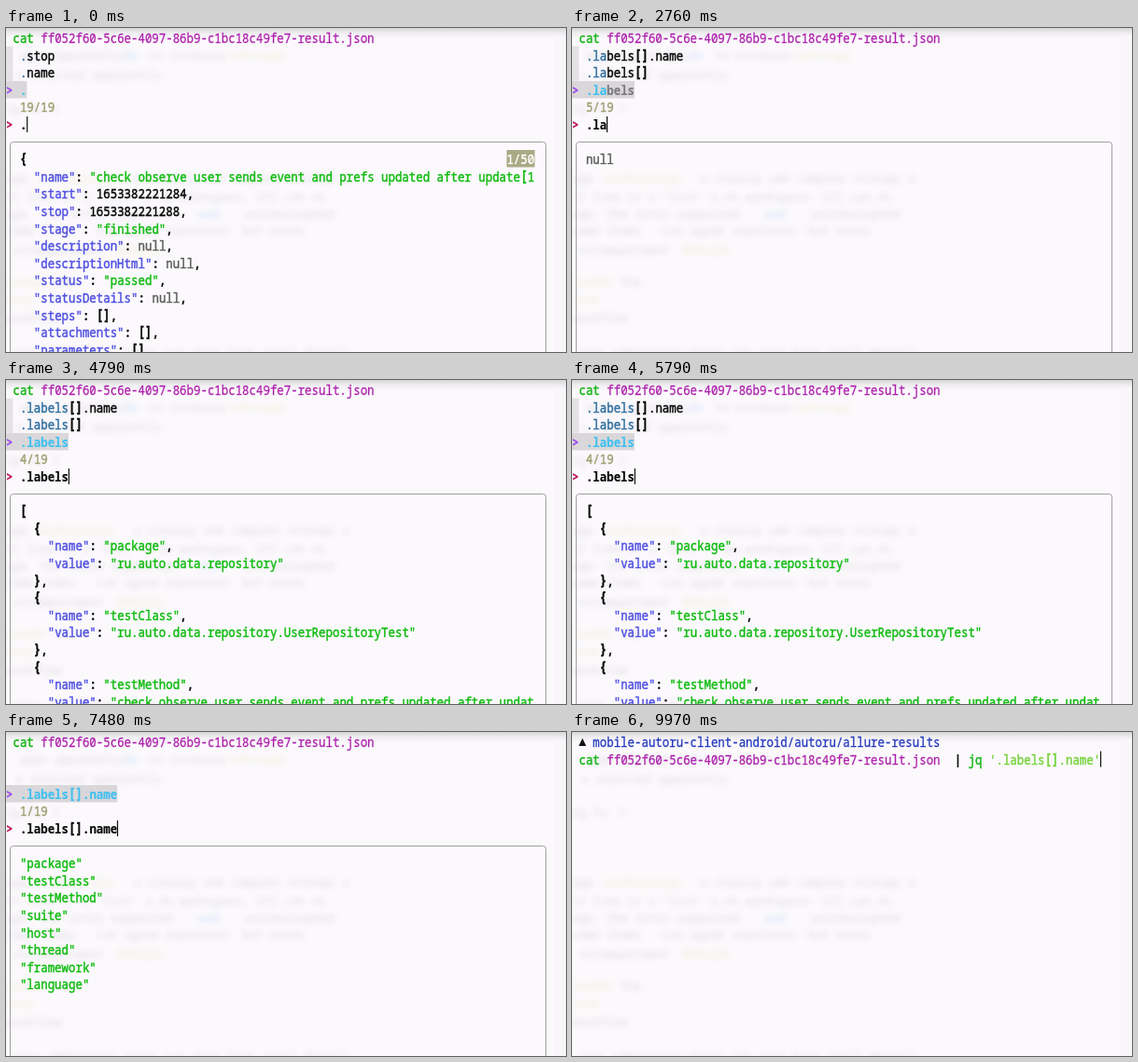
Recreate the animation shown at these times as an HTML page. Size 600x348 px, loop 10000 ms.

```html
<!DOCTYPE html>
<html lang="en">
<head>
<meta charset="utf-8">
<title>Interactive jq</title>
<style>
html, body { margin: 0; width: 100%; height: 100%; overflow: hidden; background: #fbf9fc; }
svg { display: block; width: 600px; height: 348px; }
text { font: 400 12.417px "Noto Sans Mono", "DejaVu Sans Mono", monospace; white-space: pre; font-variant-ligatures: none; }
#screen text { fill: currentColor; stroke: currentColor; stroke-width: .42px; }
#screen .file, #screen .path { stroke-width: .25px; }
#screen .b { font-weight: 700; stroke-width: .12px; }
#screen .tall { font-weight: 700; stroke-width: .3px; }
.cmd { color: #16b516; }
.file { color: #ad1fad; }
.black { color: #080808; }
.hit { color: #2f6f9f; }
.selHit { color: #3fc0f0; }
.sel { color: #7d7b7e; }
.ptr { color: #9a45ee; }
.prompt { color: #bb0d55; }
.count { color: #a0a074; }
.key { color: #5050e2; }
.str { color: #10bb10; }
.nul { color: #5c5c5c; }
.path { color: #2338bd; }
.arg { color: #75d33b; }
.badge { color: #fff; }
</style>
</head>
<body>
<svg viewBox="0 0 600 348">
  <defs>
    <linearGradient id="shade" x1="0" y1="0" x2="0" y2="1">
      <stop offset="0" stop-color="#d7d5d8"/>
      <stop offset=".45" stop-color="#efedf0"/>
      <stop offset="1" stop-color="#fbf9fc"/>
    </linearGradient>
    <filter id="soft" x="-5%" y="-5%" width="110%" height="110%"><feGaussianBlur stdDeviation="3.4"/></filter>
  </defs>
  <rect width="600" height="348" fill="#fbf9fc"/>
  <rect width="600" height="12" fill="url(#shade)"/>
  <rect x="587" y="8" width="13" height="340" fill="#f9f6fa"/>
  <g id="blur" filter="url(#soft)" opacity=".24"></g>
  <g id="screen"></g>
</svg>
<script>
const CW = 7.45, RH = 18.6, LOOP = 10000;
const $ = id => document.getElementById(id);
const esc = s => s.replace(/&/g, '&amp;').replace(/</g, '&lt;');

// the terminal face is narrow and tall, its brackets taller still
function put(row, col, s, cls) {
  const y = (15.9 + row * RH).toFixed(2);
  return s.split(/([[\]{}]+)/).map((part, i) => {
    const x = (col * CW).toFixed(2), tall = i % 2;
    col += part.length;
    return part && `<text class="${cls}${tall ? ' tall' : ''}" transform="translate(${x} ${y}) scale(1 ${tall ? 1.35 : 1.2})">${esc(part)}</text>`;
  }).join('');
}

// runs alternate text and class
function runs(row, col, ...parts) {
  let out = '';
  for (let i = 0; i < parts.length; i += 2) {
    if (parts[i]) out += put(row, col, parts[i], parts[i + 1]);
    col += parts[i].length;
  }
  return out;
}

const box = (x, y, w, h, fill) => `<rect x="${x}" y="${y}" width="${w}" height="${h}" fill="${fill}"/>`;
const caret = (row, col) => box((col * CW - .3).toFixed(1), (row * RH + 2).toFixed(1), 1.2, 17, '#111');

function json(lines) {
  const token = /("[^"]*"?)(?=:)|("[^"]*"?)|(null)|(\d+)|([^\s"\w]+)/g;
  const names = ['key', 'str', 'nul', 'black', 'black b'];
  return lines.map((line, i) => [...line.matchAll(token)].map(m =>
    put(7 + i, 2 + m.index, m[0], names[m.slice(1).findIndex(Boolean)])).join('')).join('');
}

const test = 'check observe user sends event and prefs updated after updat';
const result = ['{', `  "name": "${test}e[1`, ...[
  '"start": 1653382221284', '"stop": 1653382221288', '"stage": "finished"',
  '"description": null', '"descriptionHtml": null', '"status": "passed"',
  '"statusDetails": null', '"steps": []', '"attachments": []', '"parameters": []'
].map(s => `  ${s},`)];

const label = (name, value) => ['  {', `    "name": "${name}",`, `    "value": "${value}`, '  },'];
const labels = ['[',
  ...label('package', 'ru.auto.data.repository"'),
  ...label('testClass', 'ru.auto.data.repository.UserRepositoryTest"'),
  ...label('testMethod', test).slice(0, 3)];

const names = 'package testClass testMethod suite host thread framework language'
  .split(' ').map(s => `"${s}"`);

const command = row => runs(row, 1, 'cat', 'cmd', ' ', '',
  'ff052f60-5c6e-4097-86b9-c1bc18c49fe7-result.json', 'file');

function finder(query, count, items, preview, badge) {
  const n = query.length;
  const [chosen, ...rest] = items;
  let out = command(0);
  rest.forEach((item, i) => {
    const row = 2 - i;
    out += box(0, (row * RH + 1).toFixed(1), CW, RH, '#e4e2e5')
      + runs(row, 2, item.slice(0, n), 'hit', item.slice(n), 'black');
  });
  out += box(0, 57, ((2 + chosen.length) * CW).toFixed(1), 18.5, '#d9d7d9')
    + runs(3, 0, '>', 'ptr b', ' ', '', chosen.slice(0, n), 'selHit b', chosen.slice(n), 'sel b')
    + put(4, 2, count + '/19', 'count')
    + runs(5, 0, '>', 'prompt b', ' ', '', query, 'black b')
    + caret(5, 2 + n)
    + '<rect x="4.5" y="122.5" width="574" height="260" rx="3" fill="none" stroke="#a09ea1"/>'
    + json(preview);
  if (badge) out += box(536.5, 131, 30, 18.5, '#a9a986') + put(7, 72, badge, 'badge');
  return out;
}

const prompt = () => '<path d="M7.2 15 L11.2 6.8 L15.2 15Z" fill="#111"/>'
  + put(0, 3, 'mobile-autoru-client-android/autoru/allure-results', 'path')
  + command(1)
  + runs(1, 55, '|', 'black b', ' ', '', 'jq', 'cmd', ' ', '', "'.labels[].name'", 'arg')
  + caret(1, 76);

const found = ['.labels', '.labels[]', '.labels[].name'];
const typed = (q, count) => finder(q, count, found, ['null']);

const scenes = [
  [0, finder('.', 19, ['.', '.name', '.stop'], result, '1/50')],
  [2450, typed('.l', 6)],
  [2600, typed('.la', 5)],
  [3500, typed('.lab', 4)],
  [4500, typed('.labe', 4)],
  [4640, typed('.label', 4)],
  [4780, finder('.labels', 4, found, labels)],
  [6770, finder('.labels[].name', 1, ['.labels[].name'], names)],
  [8800, prompt()]
];

// out-of-focus page behind the terminal: y, x, text, colour
const G = '#77747a', Y = '#b9bd45', B = '#3f8fe8';
$('blur').innerHTML = [
  [34, 15, 'apps apparently', G], [34, 126, 'do', B], [34, 153, 'to increase', G], [34, 240, 'settings', Y],
  [55, 10, 'a selected apparently', G], [91, 0, 'ng fu', G], [91, 50, 'l', G],
  [166, 0, 'age', G], [166, 34, 'instruction', Y], [166, 137, 'a clearly see complex strings a', G],
  [186, 0, 'it like it a "list" a on workspace. itl can on', G],
  [204, 0, 'age. the intro supported.', G], [204, 206, 'and', B], [204, 240, '- uninterrupted', G],
  [222, 0, 'some items - can agree asynchron. but never', G],
  [243, 8, 'nicompartment', G], [243, 117, 'default', Y],
  [277, 0, 'insert', Y], [277, 52, 'the', G], [296, 0, 'over', Y], [316, 0, 'workflow', G],
  [353, 6, 'also additional notes can also have small details', G]
].map(([y, x, s, c]) => `<text x="${x}" y="${y}" fill="${c}">${s}</text>`).join('');

let shown = -1;
function draw(ms) {
  const t = ms % LOOP;
  let i = scenes.length - 1;
  while (scenes[i][0] > t) i--;
  if (i !== shown) $('screen').innerHTML = scenes[shown = i][1];
}

const start = performance.now();
function tick() {
  draw(performance.now() - start);
  requestAnimationFrame(tick);
}
tick();
</script>
</body>
</html>
```
